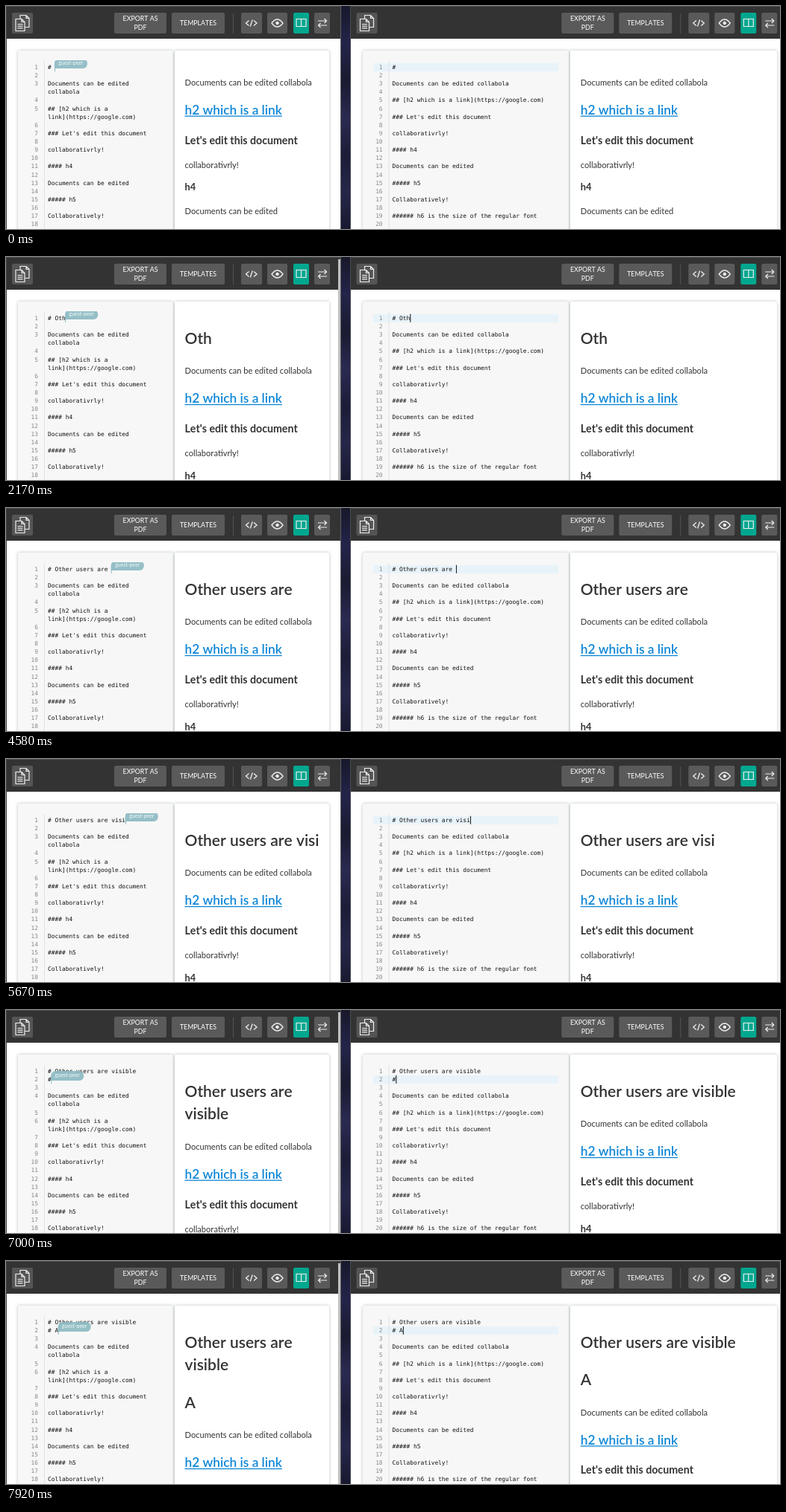
An HTML page with a canvas that plays this animation: 1037 by 300 pixels, repeating every 8 s.

```html
<!DOCTYPE html>
<html lang="en">
<head>
<meta charset="utf-8">
<title>Collaborative editor</title>
<style>
html, body { margin: 0; width: 100%; height: 100%; overflow: hidden; background: #fff; }
canvas { display: block; }
</style>
</head>
<body>
<canvas id="stage" width="1037" height="300"></canvas>
<script>
const g = document.getElementById('stage').getContext('2d');
const LOOP = 8000, ROW = 11.12, CHAR = 4.74;
const SANS = 'Lato, "Open Sans", sans-serif';
const MONO = '7.87px "DejaVu Sans Mono", monospace';
g.fontKerning = 'none';

const TYPED = 'Other users are visible\n# A';
const KEYS = [2000, 2080, 2170, 2330, 2500, 2750, 3000, 3170, 3420, 3580, 3750, 3920, 4080, 4250,
  4330, 4500, 4670, 5000, 5250, 5580, 5750, 6000, 6170, 6420, 6670, 7330, 7830];

const BODY = ['', 'Documents can be edited collabola', '', '## [h2 which is a link](https://google.com)', '',
  "### Let's edit this document", '', 'collaborativrly!', '', '#### h4', '', 'Documents can be edited', '',
  '##### h5', '', 'Collaboratively!', '', '###### h6 is the size of the regular font', '', ''];

// text, baseline without headings, font size, weight
const PREVIEW = [
  ['Documents can be edited collabola', 107, 11.1, 400],
  ['h2 which is a link', 146, 17.3, 600],
  ["Let's edit this document", 185.5, 14.2, 700],
  ['collaborativrly!', 217.8, 11.1, 400],
  ['h4', 248.2, 12.8, 700],
  ['Documents can be edited', 279.8, 11.1, 400],
  ['h5', 310, 12, 700]
];

function rect(x, y, w, h, fill) {
  g.fillStyle = fill;
  g.fillRect(x, y, w, h);
}

function round(x, y, w, h, r, fill) {
  g.fillStyle = fill;
  g.beginPath();
  g.roundRect(x, y, w, h, r);
  g.fill();
}

function text(s, x, y, font, fill, align = 'left') {
  g.font = font;
  g.fillStyle = fill;
  g.textAlign = align;
  g.fillText(s, x, y);
}

function icon(d, x, y, width = 1.3, fill) {
  const p = new Path2D(d);
  g.save();
  g.translate(x, y);
  g.lineWidth = width;
  g.strokeStyle = '#eee';
  if (fill) { g.fillStyle = fill; g.fill(p); }
  g.stroke(p);
  g.restore();
}

function toolbar(x, w, left, dx) {
  rect(x, 0, w, 44, '#333');
  rect(x, 0, w, 1, '#4a5052');
  const box = (bx, bw, fill = '#5a5a5a') => round(bx + dx, 9, bw, 28, 2, fill);
  const label = (s, lx, y) => text(s, lx + dx, y, '8.8px ' + SANS, '#fff', 'center');

  round(left, 9, 28, 28, 2, '#555');
  icon('M6 5V0H14L18 4V16H12M14 0V4H18M0 5H8L12 9V21H0ZM8 5V9H12M2.5 12H9.5M2.5 14.7H9.5M2.5 17.4H9.5',
    left + 5, 12.5, 1.2);

  box(145, 70);
  label('EXPORT AS', 180, 20);
  label('PDF', 180, 31.5);
  box(222, 71);
  label('TEMPLATES', 257.5, 25.7);
  rect(304 + dx, 10, 1, 27, '#555');
  box(315, 28);
  icon('M4 0L0 3.5L4 7M10.5 0L14.5 3.5L10.5 7M8.7 -1L5.8 8', 321.5 + dx, 19.5);
  box(350, 27);
  icon('M0 5Q7.5 -5 15 5Q7.5 15 0 5Z', 356 + dx, 18, 1.3);
  icon('M5.7 5A1.8 1.8 0 1 0 9.3 5A1.8 1.8 0 1 0 5.7 5Z', 356 + dx, 18, 1, '#eee');
  box(385, 21, '#00a78f');
  icon('M0 0H13V10H0ZM6.5 0V10', 389 + dx, 17.5, 1.2);
  box(413, 21);
  icon('M0 2H11M8.5 -1L11.5 2L8.5 5M12 8H1M3.5 5L.5 8L3.5 11', 418 + dx, 18, 1.2);
}

function panel(x, w, fill) {
  g.save();
  g.shadowColor = 'rgba(60,80,90,.35)';
  g.shadowBlur = 4;
  round(x, 60, w, 250, 2, fill);
  g.restore();
}

// Breaks a line at the last space that fits.
function wrap(s, fits) {
  if (fits(s)) return [s];
  let cut = s.lastIndexOf(' ');
  while (cut > 0 && !fits(s.slice(0, cut))) cut = s.lastIndexOf(' ', cut - 1);
  return cut > 0 ? [s.slice(0, cut), ...wrap(s.slice(cut + 1), fits)] : [s];
}

function code(lines, x, cols) {
  let row = 0;
  rect(x - 5, 74, 1, 226, '#e2e2e2');
  lines.forEach((line, i) => {
    const y = 85 + row * ROW;
    text(i + 1, x - 13, y, MONO, '#888', 'right');
    const parts = wrap(line, s => s.length <= cols);
    parts.forEach((s, k) => text(s, x, y + k * ROW, MONO, '#111'));
    row += parts.length;
  });
}

function preview(heads, x, width) {
  const font = '600 21px ' + SANS;
  let shift = 0;
  for (const head of heads) {
    g.font = font;
    const parts = wrap(head, s => g.measureText(s).width < width);
    parts.forEach((s, k) => text(s, x, 116.5 + shift + k * 30.6, font, '#333'));
    shift += 50.4 + (parts.length - 1) * 30.6;
  }
  for (const [s, y, size, weight] of PREVIEW) {
    const link = s.startsWith('h2');
    text(s, x, y + shift, `${weight} ${size}px ${SANS}`, link ? '#0d86d6' : '#333');
    if (link) rect(x, y + shift + 1.5, g.measureText(s).width, 1.3, '#0d86d6');
  }
}

function nameTag(x, y) {
  g.save();
  g.beginPath();
  g.rect(16, 73, 208, 227);
  g.clip();
  rect(x, y + 6, 1, 11, '#8fbcc4');
  round(x, y, 44, 13, [6, 6, 6, 0], 'rgba(143,188,196,.93)');
  text('guest-peer', x + 22, y + 8, '7px ' + SANS, '#f4fafa', 'center');
  g.restore();
}

function wallpaper() {
  const sky = g.createLinearGradient(0, 0, 0, 300);
  ['#17182a', '#24244a', '#1a1a30', '#2b2a52', '#1c1c38', '#26264a', '#181930']
    .forEach((c, i) => sky.addColorStop(i / 6, c));
  rect(448, 0, 14, 300, sky);
  rect(448, 0, 1, 300, '#5a5d64');
  rect(461, 0, 1, 300, '#4a4d54');
}

function pointer(t) {
  if (t < 1000 || t >= 1920) return;
  const rest = 1 - Math.min(1, (t - 1000) / 420);
  g.save();
  g.translate(908.5 + 70 * rest ** 3, 154 + 60 * rest ** 3);
  g.lineJoin = 'round';
  icon('M0 0V15L3.6 12L6.4 18.5L9 17.4L6.2 11.2L10.5 10.6Z', 0, 0, 1, '#3c3f42');
  g.restore();
}

function draw(t) {
  const count = KEYS.filter(k => k <= t).length;
  const titles = ('# ' + TYPED.slice(0, count)).split('\n');
  const lines = [...titles, ...BODY];
  const heads = titles.map(s => s.slice(2)).filter(s => s.trim());
  const active = titles.length - 1;
  const column = titles[active].length * CHAR;
  const rowTop = 76.7 + active * ROW;

  rect(0, 0, 1037, 300, '#fff');
  toolbar(0, 448, 8, 0);
  toolbar(462, 575, 469.5, 599.3);
  rect(0, 0, 1, 300, '#444');
  wallpaper();

  panel(16, 208, '#f7f7f7');
  panel(226, 207, '#fff');
  panel(478, 276, '#f7f7f7');
  panel(756, 277, '#fff');

  rect(492, rowTop, 248, ROW, '#e8f3f9');
  code(lines, 56, 28);
  code(lines, 517.6, 60);
  preview(heads, 239.5, 184);
  preview(heads, 769.7, 250);
  nameTag(56 + column - .5, rowTop - 5.7);

  const blink = t - (count ? KEYS[count - 1] : 550);
  if (blink >= 0 && blink % 1000 < 500) rect(517.6 + column, rowTop, 1, ROW, '#111');
  if (t >= 2000 && t < 3000 || t >= 5750) rect(445, 3, 3, 297, '#c0c0c0');
  pointer(t);
}

function tick(now) {
  draw(now % LOOP);
  requestAnimationFrame(tick);
}
requestAnimationFrame(tick);
</script>
</body>
</html>
```
